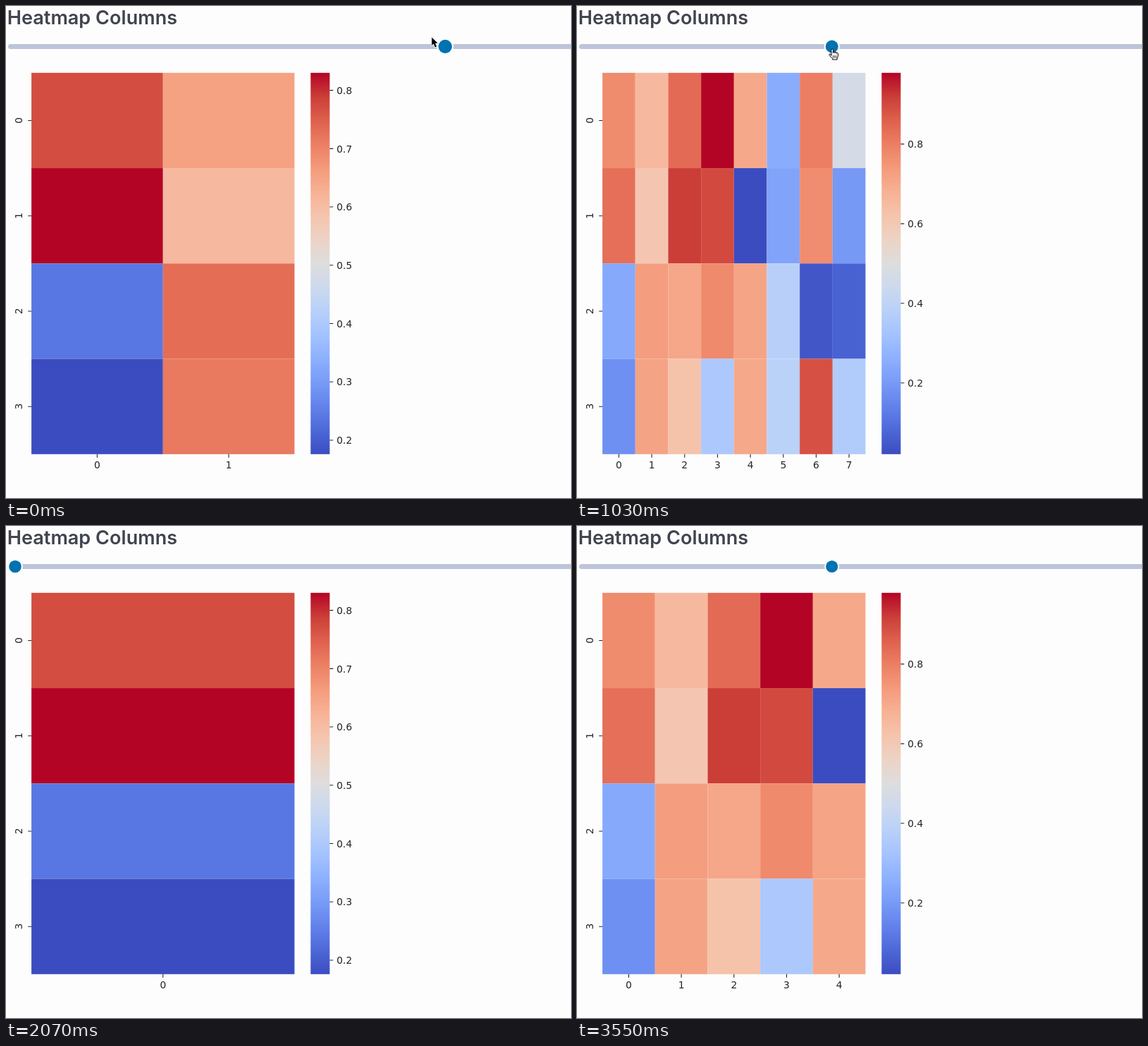
These frames come from a looping animation (802 px wide and 698 px high, 4160 ms). An HTML page:

```html
<!DOCTYPE html>
<html lang="en">
<head>
<meta charset="utf-8">
<title>Heatmap Columns</title>
<style>
  html, body { margin: 0; width: 100%; height: 100%; overflow: hidden; background: #fdfdfd; }
  svg { display: block; width: 100%; height: 100%; }
  .title { font: 600 27.1px Inter, sans-serif; fill: #40444f; }
  .axis { font: 13.89px "DejaVu Sans", sans-serif; fill: #262626; }
  .ticks { stroke: #262626; stroke-width: 1.1; fill: none; }
  .middle { text-anchor: middle; }
</style>
</head>
<body>
<svg viewBox="0 0 802 698">
  <defs>
    <linearGradient id="scale" x1="0" y1="1" x2="0" y2="0"></linearGradient>
    <path id="arrow" d="M1.4 1.6V13L4 10.6L6 15.4L8.2 14.5L6.2 9.8H9.8Z"
      fill="#000" stroke="#fff" stroke-width="1.6" paint-order="stroke" stroke-linejoin="round"/>
    <g id="hand" stroke="#000" stroke-linejoin="round" stroke-linecap="round">
      <path fill="#fff" d="M4 10V2.2a1.3 1.3 0 0 1 2.6 0V7V5.8a1.2 1.2 0 0 1 2.4 0V7V6.4a1.2 1.2 0 0 1 2.4 0V7.6a1.1 1.1 0 0 1 2.2 0V11l-1.4 3V16H5.6V14.5L1.3 10a1.1 1.1 0 0 1 1.6-1.7z"/>
      <path fill="none" stroke-width=".8" d="M6.6 10.5v3M8.7 10.5v3M10.8 10.5v3"/>
    </g>
  </defs>
  <text class="title" x="1.8" y="25.6">Heatmap Columns</text>
  <rect x="3" y="54" width="820" height="7" rx="3.5" fill="#bdc4da"/>
  <g id="thumb">
    <circle cy="57.5" fill="#fdfdfd"/>
    <circle cy="57.5" fill="#0072b0"/>
  </g>
  <g id="plot"></g>
  <use id="cursor"/>
</svg>
<script>
const LOOP = 4160;
const BOX = { x: 36.1, y: 94.8, w: 373.4, h: 541 };
const BAR = { x: 432.4, w: 27.1 };

// Diverging blue-to-red colour map, evenly spaced
const COLORS = ['3b4cc0', '4d68d7', '6282ea', '779af7', '8db0fe', 'a3c2ff', 'b8d0f9', 'ccd9ee', 'dddddd',
  'ecd3c5', 'f5c4ad', 'f7b194', 'f49a7b', 'ec7f63', 'de604d', 'cb3e38', 'b40426'];

const DATA = [
  [.771, .653, .838, .979, .704, .249, .799, .470],
  [.830, .610, .919, .898, .021, .228, .770, .197],
  [.241, .731, .707, .776, .713, .380, .043, .069],
  [.176, .715, .626, .347, .704, .386, .886, .360]
];

// time, plotted columns, slider value, thumb radius, cursor, cursor x, cursor y
const STEPS = [
  [0, 2, 8, 9.7, 'arrow', 603, 43],
  [140, 8, 8, 8.6, 'arrow', 603, 43],
  [290, 8, 8, 8.6, 'arrow', 479, 71],
  [440, 8, 8, 8.6, 'arrow', 371, 82],
  [590, 8, 8, 8.6, 'arrow', 365, 76],
  [730, 8, 8, 8.6, 'arrow', 360, 59],
  [880, 8, 5, 9.4, 'hand', 357, 60],
  [1030, 8, 5, 9, 'hand', 357, 60],
  [1180, 5, 5, 8.6, 'hand', 368, 58],
  [1330, 5, 5, 8.6, 'hand', 364, 60],
  [1470, 5, 5, 8.6, 'hand', 360, 61],
  [1620, 5, 5, 9.6, 'hand', 347, 57],
  [1770, 5, 1, 10.2, ''],
  [1920, 5, 1, 10.5, ''],
  [2070, 1, 1, 8.8, ''],
  [2220, 1, 1, 8.6, 'arrow', 131, 60],
  [2370, 1, 1, 8.6, 'arrow', 314, 57],
  [2510, 1, 1, 8.6, 'arrow', 326, 59],
  [2660, 1, 1, 8.6, 'arrow', 330, 54],
  [2810, 1, 1, 8.6, 'arrow', 331, 53],
  [2960, 1, 5, 9.2, 'arrow', 331, 53],
  [3110, 5, 5, 8.6, 'arrow', 464, 113],
  [3260, 5, 5, 8.6, 'arrow', 648, 207],
  [3400, 5, 5, 8.6, 'arrow', 665, 336],
  [3550, 5, 5, 8.6, '']
];

const $ = id => document.getElementById(id);

function colorAt(p) {
  const pos = Math.max(0, Math.min(1, p)) * (COLORS.length - 1);
  const i = Math.min(Math.floor(pos), COLORS.length - 2);
  const channel = (hex, c) => parseInt(hex.substr(c * 2, 2), 16);
  const mixed = [0, 1, 2].map(c => {
    const from = channel(COLORS[i], c);
    return Math.round(from + (channel(COLORS[i + 1], c) - from) * (pos - i));
  });
  return `rgb(${mixed})`;
}

function plotMarkup(cols) {
  const rows = DATA.map(row => row.slice(0, cols));
  const values = rows.flat();
  const min = Math.min(...values), span = Math.max(...values) - min;
  const cellW = BOX.w / cols, cellH = BOX.h / rows.length;
  const bottom = BOX.y + BOX.h, barEnd = BAR.x + BAR.w;
  let shapes = '', ticks = '', labels = '';

  rows.forEach((row, r) => {
    row.forEach((value, c) => {
      shapes += `<rect x="${BOX.x + c * cellW}" y="${BOX.y + r * cellH}" width="${cellW}" height="${cellH}" fill="${colorAt((value - min) / span)}"/>`;
    });
    const y = BOX.y + (r + .5) * cellH;
    ticks += `M${BOX.x} ${y}h-4.9`;
    labels += `<text class="middle" transform="translate(23.2 ${y}) rotate(-90)">${r}</text>`;
  });

  for (let c = 0; c < cols; c++) {
    const x = BOX.x + (c + .5) * cellW;
    ticks += `M${x} ${bottom}v4.9`;
    labels += `<text class="middle" x="${x}" y="656.4">${c}</text>`;
  }

  shapes += `<rect x="${BAR.x}" y="${BOX.y}" width="${BAR.w}" height="${BOX.h}" fill="url(#scale)"/>`;
  const step = span > .8 ? 2 : 1;
  for (let tenth = 2; tenth <= 8; tenth += step) {
    const y = bottom - (tenth / 10 - min) / span * BOX.h;
    ticks += `M${barEnd} ${y}h4.9`;
    labels += `<text x="469.2" y="${y + 5.2}">0.${tenth}</text>`;
  }
  return `${shapes}<path class="ticks" d="${ticks}"/><g class="axis">${labels}</g>`;
}

$('scale').innerHTML = COLORS.map((hex, i) =>
  `<stop offset="${i / (COLORS.length - 1)}" stop-color="#${hex}"/>`).join('');

const [ring, disc] = $('thumb').children;
let shownStep, shownCols;

function show(step) {
  const [, cols, value, radius, cursor, x, y] = step;
  if (cols !== shownCols) $('plot').innerHTML = plotMarkup(shownCols = cols);
  $('thumb').setAttribute('transform', `translate(${13 + (value - 1) * 87.2} 0)`);
  ring.setAttribute('r', radius * 1.22);
  disc.setAttribute('r', radius);
  $('cursor').setAttribute('visibility', cursor ? 'visible' : 'hidden');
  if (cursor) {
    $('cursor').setAttribute('href', '#' + cursor);
    $('cursor').setAttribute('transform', `translate(${x} ${y})`);
  }
}

const start = performance.now();
function tick() {
  const time = (performance.now() - start) % LOOP;
  const step = STEPS.filter(s => s[0] <= time).pop();
  if (step !== shownStep) show(shownStep = step);
  requestAnimationFrame(tick);
}
tick();
</script>
</body>
</html>
```
